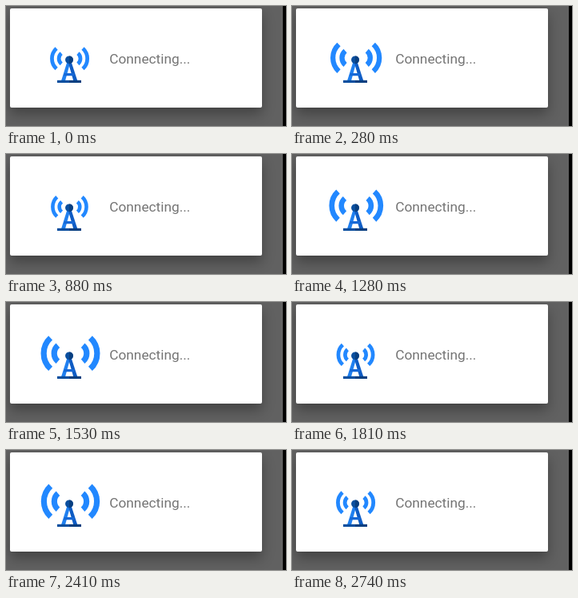
Recreate the animation shown at these times as an HTML page. Size 350 by 150 pixels, loop 2840 ms.

```html
<!DOCTYPE html>
<html lang="en">
<head>
<meta charset="utf-8">
<title>Connecting</title>
<style>
  html, body { margin: 0; width: 100%; height: 100%; overflow: hidden; background: #616161; }
  .stage { position: relative; width: 350px; height: 150px; overflow: hidden; }
  .dialog {
    position: absolute; left: 5px; top: 3px; width: 315.4px; height: 124px;
    border-radius: 2px; background: #fff;
    box-shadow: 0 8px 16px rgba(0, 0, 0, .32);
  }
  .edge { position: absolute; right: 0; top: 0; width: 4px; height: 150px; background: #000; }
  svg { position: absolute; left: 0; top: 0; }
  text { font: 17.3px Roboto, sans-serif; fill: #757575; }
  .waves { fill: none; stroke: #2288ff; stroke-width: 7.2; }
</style>
</head>
<body>
<div class="stage">
  <div class="dialog"></div>
  <div class="edge"></div>
  <svg width="350" height="150" viewBox="0 0 350 150">
    <g id="waves" class="waves"></g>
    <path d="M77 68h4L74 93.5h-5z" fill="#2080f0"/>
    <path d="M77 68h4L89.3 93.5h-5z" fill="#0f5cc4"/>
    <path d="M73 84h12l1 3.2H72z" fill="#1668d6"/>
    <circle cx="79" cy="67.3" r="4.9" fill="#0b4f9f"/>
    <path d="M79 62.4a4.9 4.9 0 0 1 0 9.8z" fill="#083f80"/>
    <path d="M64 92.8h15v3.2H64z" fill="#0b4f9f"/>
    <path d="M79 92.8h15v3.2H79z" fill="#083f80"/>
    <text x="129.2" y="72">Connecting...</text>
  </svg>
</div>
<script>
  const LOOP = 2840, LAST = 2740, STEP = 40;
  const PERIOD = 913, LEAD = 38;
  const PIVOT = { x: 77.7, y: 69 };
  const CENTER = { x: 2.8, y: -4.8 };
  const waves = document.getElementById('waves');

  // One arc, mirrored by side (-1 left, 1 right), in pivot coordinates
  function arc(side, r, degrees) {
    const a = degrees * Math.PI / 180;
    const x = CENTER.x + side * (7.2 + r * Math.cos(a));
    const dy = r * Math.sin(a);
    return `<path d="M${x} ${CENTER.y - dy}A${r} ${r} 0 0 ${side > 0 ? 1 : 0} ${x} ${CENTER.y + dy}"/>`;
  }

  waves.innerHTML = [-1, 1].map(s => arc(s, 26, 47.5) + arc(s, 13, 50)).join('');

  // The picture advances in 40 ms ticks, with two ticks 10 ms longer
  function tick(t) {
    const shift = t < 1450 ? 0 : t < 2550 ? 10 : 20;
    return Math.min(LAST, Math.floor((t - shift) / STEP) * STEP + shift);
  }

  // Decelerating growth that snaps back at the end of each period
  function scaleAt(t) {
    const u = (t + LEAD) % PERIOD / PERIOD;
    return .63 + .4 * (1 - Math.pow(1 - u, 2.2));
  }

  const start = performance.now();
  function draw() {
    const t = (performance.now() - start) % LOOP;
    waves.setAttribute('transform', `translate(${PIVOT.x} ${PIVOT.y}) scale(${scaleAt(tick(t))})`);
    requestAnimationFrame(draw);
  }
  draw();
</script>
</body>
</html>
```
